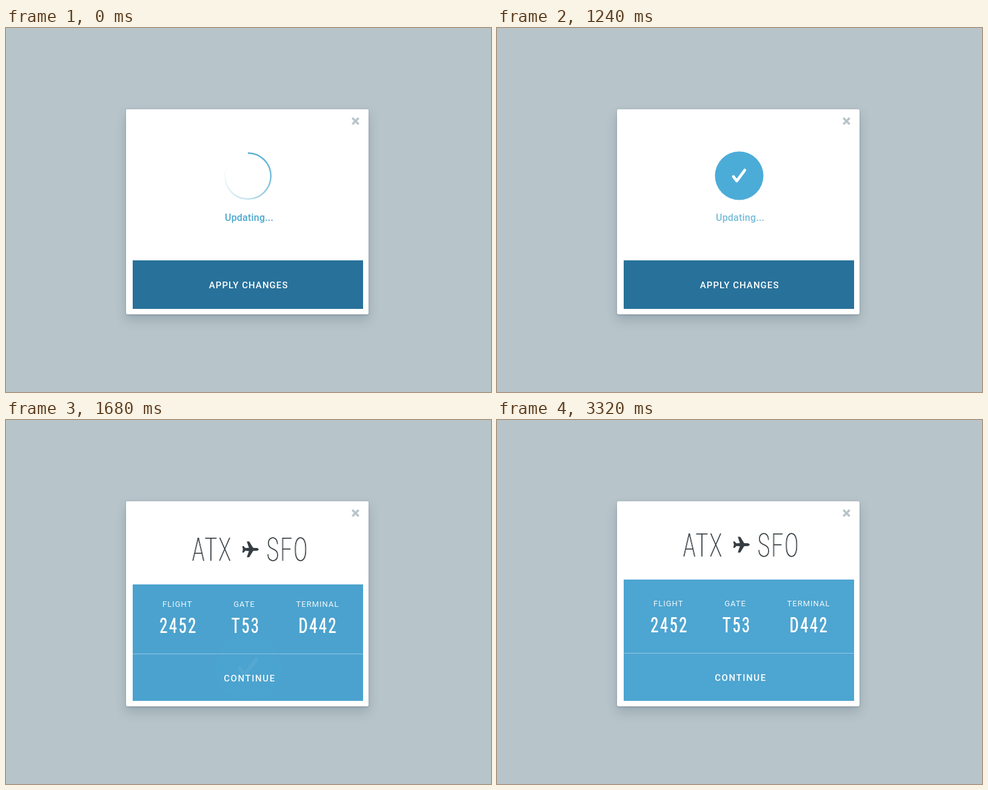
An HTML page with a canvas for the animation above (3.4 s loop, 800 by 600 pixels).

```html
<!DOCTYPE html>
<html lang="en">
<head>
<meta charset="utf-8">
<title>Flight update</title>
<style>
  html, body { margin: 0; width: 100%; height: 100%; overflow: hidden; background: #b7c4c9; }
  canvas { display: block; }
</style>
</head>
<body>
<canvas id="stage" width="800" height="600"></canvas>
<script>
const ctx = document.getElementById('stage').getContext('2d');
const LOOP = 3400, STEP = 40;
const BG = [183, 196, 201], WHITE = [255, 255, 255], INK = [53, 61, 66];
const NAVY = [40, 113, 154], SKY = [77, 165, 209], DISC = [76, 172, 216], SPIN = [76, 168, 207];
const FACE = 'Roboto, "Liberation Sans", sans-serif';

const rgb = (c, a = 1) => `rgba(${c.map(Math.round)},${a})`;
const lerp = (a, b, p) => a + (b - a) * p;
const mix = (c, d, p) => c.map((v, i) => lerp(v, d[i], p));
const ramp = (t, from, to) => Math.min(1, Math.max(0, (t - from) / (to - from)));
const ease = p => (1 - Math.cos(Math.PI * p)) / 2;
const tween = (t, from, to, a, b) => lerp(a, b, ease(ramp(t, from, to)));

// Glides to a point just past rest, then drifts back to zero.
function settle(t, from, to, start, past) {
  return t < to ? tween(t, from, to, start, past) : past * (1 - ease(ramp(t, to, to + 400)));
}

function label(str, x, y, size, weight, spacing, color) {
  ctx.font = `${weight} ${size}px ${FACE}`;
  ctx.letterSpacing = spacing + 'px';
  ctx.fillStyle = color;
  ctx.fillText(str, x + spacing / 2, y);
}

// Condensed display face: narrowed letters with stems thickened to match the bars.
function condensed(str, x, y, size, weight, spacing, color) {
  const k = 0.61;
  for (const dx of [-0.45, 0.45]) {
    ctx.save();
    ctx.translate(x + dx, y);
    ctx.scale(k, 1);
    label(str, 0, 0, size, weight, spacing / k, color);
    ctx.restore();
  }
}

function polyline(points, width, color, cap) {
  ctx.beginPath();
  points.forEach(([x, y]) => ctx.lineTo(x, y));
  ctx.lineWidth = width;
  ctx.lineCap = cap;
  ctx.lineJoin = 'round';
  ctx.strokeStyle = color;
  ctx.stroke();
}

function drawCard() {
  ctx.fillStyle = rgb(BG);
  ctx.fillRect(0, 0, 800, 600);
  ctx.fillStyle = '#fff';
  for (const [dy, blur, alpha] of [[9, 18, 0.22], [1, 3, 0.3]]) {
    ctx.save();
    ctx.shadowColor = `rgba(50,75,95,${alpha})`;
    ctx.shadowOffsetY = dy;
    ctx.shadowBlur = blur;
    ctx.beginPath();
    ctx.roundRect(198, 134, 400, 338, 3);
    ctx.fill();
    ctx.restore();
  }
  polyline([[571.3, 148.3], [581.7, 158.7]], 3.4, rgb(BG), 'butt');
  polyline([[581.7, 148.3], [571.3, 158.7]], 3.4, rgb(BG), 'butt');
}

function drawSpinner(t) {
  const alpha = 1 - ramp(t, 640, 720);
  if (!alpha) return;
  const turn = -Math.PI / 2 - 2 * Math.PI * ease(ramp(t, 40, 640));
  const fade = ctx.createConicGradient(turn, 399, 244);
  for (const [at, a] of [[0, 1], [0.25, 0.8], [0.5, 0.36], [0.75, 0.06], [0.85, 0], [1, 0]]) {
    fade.addColorStop(at, rgb(SPIN, a * alpha));
  }
  ctx.beginPath();
  ctx.arc(399, 244, 37.9, 0, 2 * Math.PI);
  ctx.lineWidth = 2.4;
  ctx.strokeStyle = fade;
  ctx.stroke();
}

function drawPlane(x, y, color) {
  const half = [[14, 0], [11.5, -2.3], [4.5, -2.5], [-2, -13], [-6, -13], [-2.5, -2.6],
    [-8.5, -2.2], [-11, -5.2], [-13.5, -5.2], [-12.4, 0]];
  const lower = half.slice(1, -1).reverse().map(([px, py]) => [px, -py]);
  ctx.beginPath();
  [...half, ...lower].forEach(([px, py]) => ctx.lineTo(x + px, y + py));
  ctx.fillStyle = color;
  ctx.fill();
}

function drawTitle(t) {
  const alpha = ramp(t, 1400, 1576);
  if (!alpha) return;
  const dy = settle(t, 1400, 1744, 116, -2);
  const color = rgb(mix(WHITE, INK, alpha));
  condensed('ATX', 339, 224.5 + dy, 54.5, 100, 3, color);
  condensed('SFO', 463.5, 224.5 + dy, 54.5, 100, 3, color);
  drawPlane(403.2, 205.5 + dy, color);
}

function drawPanel(t) {
  const top = 263 + settle(t, 1452, 1730, 120, -1.4);
  ctx.fillStyle = rgb(mix(NAVY, SKY, ramp(t, 1520, 1690)));
  ctx.fillRect(209, top, 380, 463 - top);

  ctx.save();
  ctx.beginPath();
  ctx.rect(209, top, 380, 463 - top);
  ctx.clip();
  const dy = settle(t, 1500, 1700, 34, 0.2);
  ctx.globalAlpha = ramp(t, 1550, 1680);
  ctx.fillStyle = 'rgba(255,255,255,0.4)';
  ctx.fillRect(209, 384 + dy, 380, 1);
  const facts = [['FLIGHT', '2452', 282.2, 283.3], ['GATE', 'T53', 392.5, 394.4], ['TERMINAL', 'D442', 513.5, 513.6]];
  for (const [name, value, x, vx] of facts) {
    label(name, x, 307.3 + dy, 13, 400, 1, 'rgba(255,255,255,0.92)');
    condensed(value, vx, 350.3 + dy, 35.5, 400, 3.5, '#fff');
  }
  ctx.globalAlpha = ramp(t, 1440, 1590);
  label('CONTINUE', 401.2, 429.6 + settle(t, 1430, 1620, -48, 1.2), 15, 500, 1.6, '#fff');
  ctx.restore();
}

function drawDisc(t) {
  const alpha = 1 - ramp(t, 1510, 1690);
  if (t < 600 || !alpha) return;
  const y = tween(t, 1260, 1567, 243.5, 408);
  const hole = 38.5 * (1 - ramp(t, 600, 800));
  ctx.save();
  ctx.globalAlpha = alpha;
  ctx.translate(399.5, y);
  const grow = lerp(1, 1.4, ramp(t, 1520, 1680));
  ctx.scale(grow, grow);
  ctx.beginPath();
  ctx.arc(0, 0, 40, 0, 2 * Math.PI);
  ctx.arc(0, 0, hole, 0, 2 * Math.PI, true);
  ctx.fillStyle = rgb(DISC);
  ctx.fill();
  const pop = tween(t, 740, 960, 0, 1);
  if (pop) {
    ctx.scale(pop, pop);
    polyline([[-9.6, 1.4], [-4, 8.6], [9.2, -9.2]], 4.7, '#fff', 'round');
  }
  ctx.restore();
}

function draw(t) {
  ctx.textAlign = 'center';
  ctx.textBaseline = 'alphabetic';
  drawCard();
  const note = 1 - ramp(t, 1190, 1400);
  if (note) label('Updating...', 401, 318, 16, 500, 0.2, rgb(SPIN, note));
  drawTitle(t);
  drawPanel(t);
  drawDisc(t);
  drawSpinner(t);
  const apply = 1 - ramp(t, 1420, 1600);
  if (apply) label('APPLY CHANGES', 399.6, 429.3, 15, 500, 1.05, rgb(WHITE, apply));
}

const start = performance.now();
function frame() {
  const t = (performance.now() - start) % LOOP;
  draw(Math.floor(t / STEP) * STEP);
  requestAnimationFrame(frame);
}
frame();
</script>
</body>
</html>
```
